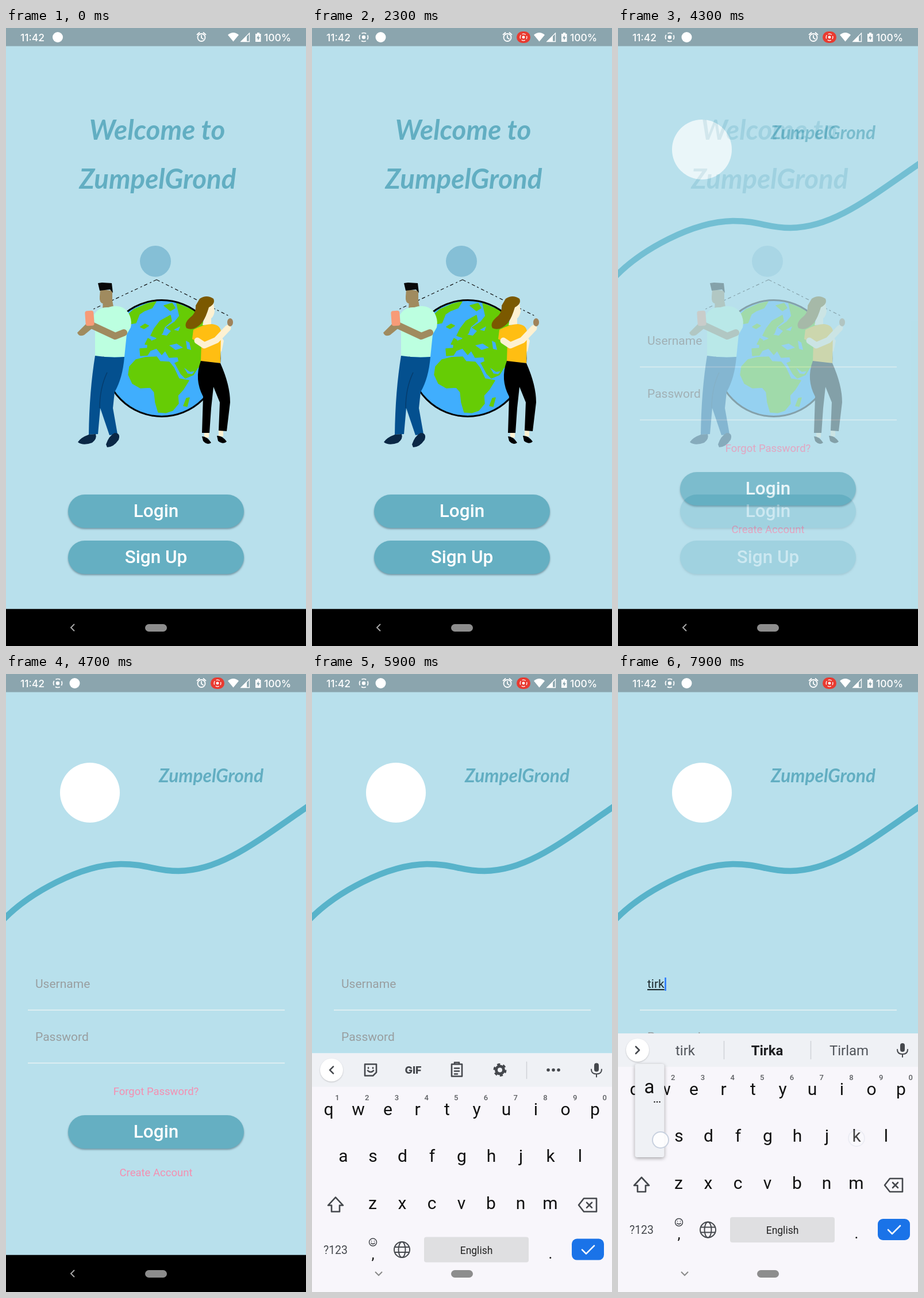
Recreate the animation shown at these times as an HTML page. Size 522x1073 px, loop 8 s.

```html
<!DOCTYPE html>
<html lang="en">
<head>
<meta charset="utf-8">
<title>Welcome and login</title>
<style>
  html, body { margin: 0; width: 100%; height: 100%; overflow: hidden; background: #b8e0ec; }
  svg { display: block; width: 100vw; height: 100vh; }
  text { font-family: Roboto, sans-serif; }
  .mid { text-anchor: middle; }
  .brand { font-family: Lato, sans-serif; font-weight: 700; font-style: italic; fill: #62aec2; }
  .btn { font-size: 31.5px; font-weight: 500; fill: #fff; text-anchor: middle; }
  .hint { font-size: 21px; fill: #999ea0; }
  .link { font-size: 18.5px; fill: #f48fb1; text-anchor: middle; }
  .bar { font-family: Inter, sans-serif; font-size: 17.5px; font-weight: 500; fill: #fff; }
  .key { font-size: 30px; fill: #111; text-anchor: middle; }
  .num { font-size: 13px; font-weight: 500; fill: #5c5e62; text-anchor: middle; }
  .word { font-size: 24px; fill: #50545a; text-anchor: middle; }
  .icon { fill: none; stroke: #45484d; stroke-width: 2.6; stroke-linejoin: round; stroke-linecap: round; }
  .line { fill: none; stroke: #fff; stroke-width: 1.8; stroke-linecap: round; }
  .pad { fill: #65afc2; filter: drop-shadow(0 2px 1.5px rgba(50, 80, 95, .5)); }
  #pop { filter: drop-shadow(0 2px 3px rgba(0, 0, 0, .35)); }
</style>
</head>
<body>
<svg viewBox="0 0 522 1073" preserveAspectRatio="none" xmlns="http://www.w3.org/2000/svg">
  <defs>
    <clipPath id="pill"><rect x="108" y="810" width="306" height="58" rx="29"/></clipPath>
    <clipPath id="earth"><circle cx="271" cy="573.5" r="100"/></clipPath>
    <g id="rec">
      <circle r="3.2" fill="currentColor"/>
      <circle r="7.5" fill="none" stroke="currentColor" stroke-width="1.7" stroke-dasharray="8.2 3.6" stroke-dashoffset="4"/>
    </g>
  </defs>
  <rect width="522" height="1073" fill="#b8e0ec"/>

  <g id="welcome">
    <text class="brand mid" x="263" y="194" font-size="47.5">Welcome to</text>
    <text class="brand mid" x="264" y="279" font-size="47.5">ZumpelGrond</text>
    <circle cx="260" cy="405" r="27" fill="#85bfd6"/>
    <path d="M262 437L148 490M262 437L390 501" stroke="#111" stroke-width="1.2" stroke-dasharray="6 4 3 5"/>

    <circle cx="271" cy="573.5" r="101" fill="#40aefd"/>
    <g clip-path="url(#earth)" fill="#66cc05" stroke="#66cc05" stroke-width="1.5" stroke-linejoin="round">
      <path d="M213 602L215 588 226 576 242 572 262 571 268 579 284 580 292 590 301 609 318 612 308 628 299 638 300 652 290 664 278 668 265 667 260 650 258 632 251 624 234 625 220 617Z"/>
      <path d="M297 478L330 492 348 520 348 588 334 589 326 602 312 608 304 600 294 582 301 579 299 571 284 572 277 560 271 567 262 556 251 560 246 568 234 569 233 557 246 556 247 546 260 541 270 533 280 535 288 526 279 520 294 510 302 500Z"/>
      <path d="M252 534L258 522 268 509 286 499 288 509 276 519 272 530 263 538Z"/>
      <path d="M206 504L222 489 245 479 261 475 254 486 241 491 232 497 226 512 214 514Z"/>
      <path d="M242 549l5-10 5 3-4 8zM309 656l5-13 5-1-4 15zM275 482l14-4 5 8-8 5zM234 519l8-5 6 3-8 5z"/>
      <path fill="#40aefd" stroke="none" d="M284 551l13-3 11 7-13 4zM313 543l6 3 3 13-7-2zM291 584l3-1 13 25-3 0zM310 590l10 7 8-1-4 5-8-1zM292 524l11-6-3 8z"/>
    </g>
    <circle cx="271" cy="573.5" r="101" fill="none" stroke="#050505" stroke-width="3"/>

    <g>
      <path fill="#a08b5f" d="M164 454L185 456V473Q187 484 187 485L168 486 169 479Q162 477 163 466Z"/>
      <path fill="#080808" d="M160 443L167 442 184 443 186 460 181 454 163 456Z"/>
      <path fill="#bcffe0" d="M153 498Q161 484 178 485 200 478 212 493 220 505 217 520L210 532 206 571Q180 573 155 569L155 530Z"/>
      <path fill="#a08b5f" d="M124 529L140 513 151 511 153 519 136 533Q127 537 124 529Z"/>
      <path fill="none" stroke="#a08b5f" stroke-width="12" stroke-linecap="round" stroke-linejoin="round" d="M147 515L190 535 205 529"/>
      <rect x="138" y="491" width="15" height="26" rx="4" fill="#f79b77" transform="rotate(-4 145 504)"/>
      <path fill="#04508f" d="M155 569Q180 573 206 571 203 608 189 632L186 660 194 705 180 707 164 660 160 705 144 706Q145 630 155 569Z"/>
      <path fill="none" stroke="#063c6c" stroke-width="1.5" d="M176 598Q163 625 163 660"/>
      <path fill="#0b2846" d="M125 719Q130 711 144 706L156 705Q159 713 150 720 134 726 125 719ZM174 723Q179 708 189 703 200 703 196 715 187 728 176 728Z"/>
    </g>
    <g>
      <path fill="#fdf1d2" d="M349 479L361 477 363 492Q361 502 357 504L357 515 342 516 347 492Z"/>
      <path fill="#7b5900" d="M337 470Q349 462 361 470 365 479 353 485 347 505 340 513 326 527 314 521 309 513 320 503 331 495 330 482Z"/>
      <path fill="#fdf1d2" d="M373 533L379 543 375 562 371 560Z"/>
      <path fill="#ffbe12" d="M326 524Q345 514 358 514 372 515 374 526L373 582 339 579 340 548 324 540Z"/>
      <path fill="none" stroke="#fdf1d2" stroke-width="11" stroke-linecap="round" stroke-linejoin="round" d="M333 543L345 551 366 542 386 521"/>
      <ellipse cx="390" cy="511" rx="5" ry="7" fill="#a0835a"/>
      <path fill="#fdf1d2" d="M345 700h8v11h-8zM370 697h8v12h-8z"/>
      <path d="M339 578L373 582Q390 620 390 650L384 700 370 699 372 650 361 623 357 660 354 703 341 703 343 640Q327 610 339 578ZM341 709Q350 709 357 720 350 725 343 717ZM367 708Q376 707 384 718 378 724 369 717Z"/>
    </g>

    <rect id="lift" class="pad" x="108" y="810" width="306" height="58" rx="29"/>
    <g id="ink" clip-path="url(#pill)">
      <rect x="108" y="810" width="306" height="58" fill="#3f7f90" opacity=".16"/>
      <circle id="ripple" cx="332" cy="832" fill="#3f7890" opacity=".4"/>
    </g>
    <text class="btn" x="261" y="849">Login</text>
    <rect class="pad" x="108" y="890" width="306" height="58" rx="29"/>
    <text class="btn" x="261" y="929">Sign Up</text>
  </g>

  <g id="login">
    <rect width="522" height="1073" fill="#b8e0ec"/>
    <circle cx="146" cy="206" r="52" fill="#fff"/>
    <text class="brand" x="266" y="188" font-size="31.7">ZumpelGrond</text>
    <path fill="none" stroke="#58b3ca" stroke-width="10.5" d="M-6 428C40 380 130 331 200 330C248 330 258 342 300 342C375 342 440 288 528 228"/>
    <text id="user" class="hint" x="51" y="545">Username</text>
    <rect id="caret" y="527" width="2.6" height="23" fill="#2979ff"/>
    <text class="hint" x="51" y="637">Password</text>
    <path d="M38 583.5H485M38 675.5H485" stroke="#e9f3f4" stroke-width="1.6"/>
    <text class="link" x="261" y="730.5">Forgot Password?</text>
    <rect class="pad" x="108" y="766" width="306" height="58" rx="29"/>
    <text class="btn" x="261" y="805">Login</text>
    <text class="link" x="261" y="871.5">Create Account</text>
  </g>

  <rect y="1008.7" width="522" height="65"/>

  <g id="board">
    <rect y="624" width="522" height="449" fill="#f8f6fb"/>
    <rect y="624" width="522" height="58" fill="#eff1f5"/>
    <circle cx="34" cy="653" r="20" fill="#fff" style="filter:drop-shadow(0 1px 1px rgba(0,0,0,.2))"/>
    <path id="arrow" class="icon"/>
    <g class="icon">
      <rect x="491" y="641" width="8" height="15" rx="4" fill="#45484d" stroke="none"/>
      <path stroke-width="2" d="M486 652q0 8 9 8t9-8M495 660v5"/>
      <path d="M41 874L28 888H34V899H48V888H54Z"/>
      <path d="M473 876H495V899H473L464 887.5ZM478 883l9 9m0-9l-9 9"/>
    </g>
    <g id="tools" class="icon">
      <path d="M92 643h20v14l-6 6h-14zM98 649v1m8-1v1m-9 4q5 5 10 0"/>
      <text class="mid" x="176" y="659.5" font-size="18" style="font-family:Inter,sans-serif;font-weight:800" fill="#45484d" stroke="none">GIF</text>
      <path d="M243 643h18v21h-18zM248 643v-3h8v3M248 650h8m-8 5h8m-8 5h5"/>
      <circle cx="327" cy="653" r="6.5" stroke-width="5"/>
      <circle cx="327" cy="653" r="9.5" style="stroke-width:4;stroke-linecap:butt" stroke-dasharray="5 4.95"/>
      <path d="M373.5 639V668" style="stroke:#cfd2d8;stroke-width:1.5"/>
      <path d="M411 653h.1m8.9 0h.1m8.9 0h.1" style="stroke-width:5.5"/>
    </g>
    <g id="words">
      <path d="M184.5 637V669M335.5 637V669" stroke="#cfd2d8" stroke-width="1.5"/>
      <text class="word" x="117" y="662"></text>
      <text class="word" x="259.5" y="662" style="font-weight:700;fill:#1e1f22"></text>
      <text class="word" x="402" y="662"></text>
    </g>
    <g id="keys"></g>
    <text class="mid" x="41" y="972" font-size="19.5" fill="#45484d">?123</text>
    <circle class="icon" cx="106" cy="952" r="6.5" style="stroke-width:1.5"/>
    <path class="icon" style="stroke-width:1.6" d="M103.5 950v.1m5-.1v.1m-5.5 3.5q3 3 6 0"/>
    <text class="key" x="106" y="981" style="font-size:26px">,</text>
    <text class="key" x="415" y="980" style="font-size:26px">.</text>
    <g class="icon" style="stroke-width:2">
      <circle cx="156.5" cy="965" r="13.5"/><ellipse cx="156.5" cy="965" rx="6" ry="13.5"/>
      <path d="M144 960.5H169M144 969.5H169"/>
    </g>
    <rect x="195" y="943" width="182" height="44" rx="4" fill="#dfdfe1"/>
    <text class="mid" x="286" y="972" font-size="17.5" fill="#222">English</text>
    <rect x="452" y="946" width="56" height="37" rx="9" fill="#1a73e8"/>
    <path class="icon" style="stroke:#fff" d="M470 965l7 7 14-14"/>
    <g id="pop">
      <rect x="-25" y="-129" width="51" height="162" rx="4" fill="#eff1f5"/>
      <text class="key" y="-78" style="font-size:33px">a</text>
      <path d="M9-63h.1m4.4 0h.1m4.4 0h.1" stroke="#222" stroke-width="2.4" stroke-linecap="round"/>
    </g>
  </g>

  <path id="back" fill="none" stroke-width="2" d="M3-6L-3 0 3 6"/>
  <rect x="242" y="1035" width="38" height="13" rx="6.5" fill="#8d8d8d"/>
  <g id="dots"></g>

  <rect width="522" height="31.5" fill="#8ba5ae"/>
  <text class="bar" x="25" y="23">11:42</text>
  <g id="recIcon" color="#fff"><use href="#rec"/></g>
  <circle id="badge" cy="16" r="9" fill="#fff"/>
  <g class="line"><circle cx="340" cy="16.5" r="6.5"/><path d="M340 13v4l3 2M332.500 11.500l4-3.500m11 3.500l-4-3.500"/></g>
  <g id="recPill" color="#fff"><rect x="-12" y="-10" width="24" height="20" rx="10" fill="#e93a30"/><use href="#rec" transform="scale(.78)"/></g>
  <path fill="#fff" d="M386 12Q395.500 4 405 12L395.500 23.500Z"/>
  <path fill="#fff" d="M419 13V24H408Z"/><path class="line" style="stroke-width:1.3" d="M423.500 9V23.500H409Z"/>
  <path fill="#fff" d="M434 10h3V8h4v2h2.500v14h-9.500z"/><path fill="#8ba5ae" d="M439.500 12l-3.500 6h2.300v4l3.500-6h-2.300z"/>
  <text class="bar" x="449" y="23">100%</text>
</svg>
<script>
const LOOP = 8000, STEP = 100;
const $ = id => document.getElementById(id);
const clamp = v => Math.min(1, Math.max(0, v));
const span = (t, from, len) => clamp((t - from) / len);
const show = (el, on) => { el.style.display = on ? '' : 'none'; };

// Cubic Bezier timing, solved by bisection
function ease(x, x1, y1, x2, y2) {
  const at = (s, a, b) => 3 * s * (1 - s) ** 2 * a + 3 * s * s * (1 - s) * b + s ** 3;
  let lo = 0, hi = 1;
  for (let i = 0; i < 24; i++) {
    const mid = (lo + hi) / 2;
    if (at(mid, x1, x2) < x) lo = mid; else hi = mid;
  }
  return at(lo, y1, y2);
}

const rows = [['qwertyuiop', 29, 731], ['asdfghjkl', 54.5, 812], ['zxcvbnm', 105.5, 894]];
const keyPos = {};
let keyMarkup = '';
rows.forEach(([letters, x0, y], row) => [...letters].forEach((ch, i) => {
  const x = x0 + i * 51.5;
  keyPos[ch] = [x, y];
  keyMarkup += `<text class="key" x="${x}" y="${y}">${ch}</text>`;
  if (!row) keyMarkup += `<text class="num" x="${44 + i * 51.7}" y="705">${(i + 1) % 10}</text>`;
}));
$('keys').innerHTML = keyMarkup;

const HOLD = 200;
const taps = [['t', 6500], ['i', 6900], ['r', 7200], ['k', 7600], ['a', 7800]];
const guesses = [['t', 'the', 'to'], ['ti', 'time', 'tip'], ['tir', 'tire', 'tired'], ['tirk', 'Tirka', 'Tirlam']];
const touches = [[332, 832, 4000], [150, 545, 5400]].concat(taps.map(([ch, at]) => {
  const [x, y] = keyPos[ch];
  return ch === 'a' ? [x + 19.5, y - 3, at, true] : [x, y - 6, at, true];
}));

function drawStatus(t) {
  const k = span(t, 0, 300);
  $('recIcon').setAttribute('transform', `translate(90 16) scale(${k})`);
  $('recPill').setAttribute('transform', `translate(368 16) scale(${k})`);
  $('badge').setAttribute('cx', 90 + 29.5 * k);
}

function drawPages(t) {
  const p = span(t, 4100, 245), login = $('login');
  show(login, p > 0);
  login.setAttribute('opacity', ease(p, .42, 0, 1, 1));
  login.setAttribute('transform', `translate(0 ${244 * (1 - ease(p, .4, 0, .2, 1))})`);
  show($('welcome'), p < 1);

  const press = span(t, 3900, 200) * (1 - span(t, 4100, 200));
  $('ink').setAttribute('opacity', press);
  $('ripple').setAttribute('r', 70 * Math.max(0, t - 3900) / 200);
  $('lift').style.filter = press ? `drop-shadow(0 ${2 + 4 * press}px ${1.5 + 3 * press}px rgba(50,80,95,.5))` : '';
}

function drawField(t) {
  const count = taps.filter(([ch, at]) => ch !== 'a' && t >= at + HOLD).length;
  const user = $('user');
  user.textContent = count ? guesses[count - 1][0] : 'Username';
  user.style.fill = count ? '#1d2b30' : '';
  user.style.textDecoration = count ? 'underline' : '';
  $('caret').setAttribute('x', count ? 51.5 + user.getComputedTextLength() : 51);
  show($('caret'), t >= 5600 && t < 5900 || t >= 6400);
  return count;
}

function drawBoard(t, count) {
  const p = span(t, 5700, 400), open = p > 0;
  show($('board'), open);
  $('board').setAttribute('transform', `translate(0 ${449 * (1 - p) ** 3.7})`);
  show($('tools'), !count);
  show($('words'), count);
  $('arrow').setAttribute('d', count ? 'M31 647l6 6-6 6' : 'M37 647l-6 6 6 6');
  if (count) $('words').querySelectorAll('text').forEach((el, i) => { el.textContent = guesses[count - 1][i]; });

  const tap = taps.find(([, at]) => t >= at && t < at + HOLD);
  show($('pop'), tap);
  if (tap) {
    const [x, y] = keyPos[tap[0]];
    $('pop').setAttribute('transform', `translate(${x} ${y - 6})`);
    $('pop').querySelector('text').textContent = tap[0];
  }
  $('back').setAttribute('stroke', open ? '#8a8a8a' : '#a5a5a5');
  $('back').setAttribute('transform', `translate(116 1041) rotate(${-90 * ease(span(t, 5600, 270), .42, 0, .58, 1)})`);
}

function drawTouches(t) {
  $('dots').innerHTML = touches.map(([x, y, at, onKey]) => {
    const age = t - at, tail = onKey ? 200 : 0;
    if (age < 0 || age >= HOLD + tail) return '';
    const fade = age < HOLD ? 1 : (400 - age) / 400;
    const look = onKey ? 'fill="#fff" fill-opacity=".85" stroke="#c8d1df" stroke-width="2"'
                       : 'fill="#d5e4ea" fill-opacity=".4"';
    return `<circle cx="${x}" cy="${y}" r="14" ${look} opacity="${fade}"/>`;
  }).join('');
}

function draw(t) {
  drawStatus(t);
  drawPages(t);
  drawBoard(t, drawField(t));
  drawTouches(t);
}

let last = -1;
const start = performance.now();
function tick(now) {
  const t = Math.floor(Math.max(0, now - start) % LOOP / STEP) * STEP;
  if (t !== last) draw(last = t);
  requestAnimationFrame(tick);
}
draw(0);
requestAnimationFrame(tick);
</script>
</body>
</html>
```
